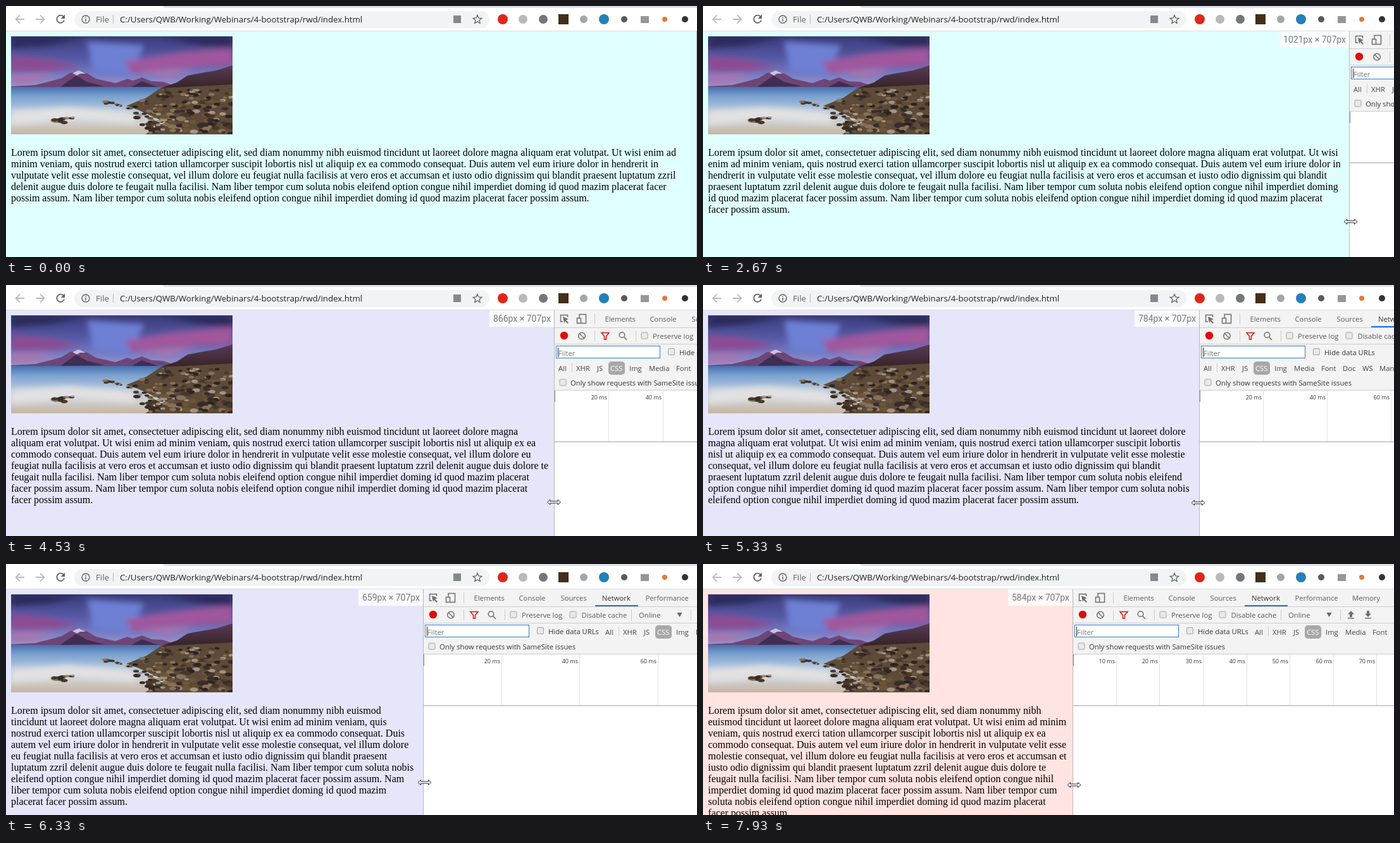
Recreate the animation shown at these times as an HTML page. Size 1092 px wide and 397 px high, loop 8000 ms.

```html
<!DOCTYPE html>
<html lang="en">
<head>
<meta charset="utf-8">
<title>Responsive page resize</title>
<style>
html, body { margin: 0; width: 100%; height: 100%; overflow: hidden; background: #fff; }
#page { position: absolute; left: 0; top: 40px; height: 357px; overflow: hidden; }
#photo { position: absolute; left: 8px; top: 8px; }
#page p { position: absolute; left: 8px; right: 8px; top: 183px; margin: 0; font: 16px/18px "Liberation Serif", serif; color: #000; }
#size { position: absolute; right: 0; top: 0; height: 26px; padding: 0 5px 0 6px; background: rgba(255,255,255,.8); color: #777; font: 14px/27px Roboto, sans-serif; white-space: nowrap; }
#stage { position: absolute; left: 0; top: 0; font: 11.25px "Open Sans", sans-serif; }
.line { fill: none; stroke: #6e6e6e; stroke-width: 1.5; }
</style>
</head>
<body>
<div id="page">
  <svg id="photo" width="350" height="155">
    <defs>
      <linearGradient id="sky" x2="0" y2="1">
        <stop offset="0" stop-color="#393b78"/><stop offset=".45" stop-color="#575ba8"/>
        <stop offset=".8" stop-color="#7f83c6"/><stop offset="1" stop-color="#a596c4"/>
      </linearGradient>
      <linearGradient id="shore" x2="0" y2="1">
        <stop offset="0" stop-color="#4670ae"/><stop offset=".2" stop-color="#7ba2d0"/>
        <stop offset=".5" stop-color="#b4c7dc"/><stop offset=".75" stop-color="#cfccca"/>
        <stop offset="1" stop-color="#c5b6a4"/>
      </linearGradient>
      <linearGradient id="hill" x2="0" y2="1">
        <stop offset="0" stop-color="#5b3a55"/><stop offset=".6" stop-color="#38262b"/>
        <stop offset="1" stop-color="#4a3a2a"/>
      </linearGradient>
      <filter id="soft" x="-30%" y="-60%" width="160%" height="220%"><feGaussianBlur stdDeviation="5"/></filter>
    </defs>
    <rect width="350" height="82" fill="url(#sky)"/>
    <g filter="url(#soft)">
      <path fill="#29295a" d="M0 0H120L60 14 0 18ZM350 0H240L300 14 350 18Z"/>
      <path fill="#6d80d4" d="M120 8L210 14 190 62 130 56Z"/>
      <path fill="#8c4b92" d="M0 30L60 36 110 48 70 54 0 56Z"/>
      <path fill="#a1579c" d="M180 40L260 26 350 18V46L250 50 190 58Z"/>
      <path fill="#a875ae" d="M0 60H70L30 74H0ZM200 56L290 50 250 66Z"/>
    </g>
    <path fill="#6d4577" d="M0 79L38 77 62 71 80 66 93 58 107 55 121 59 134 67 152 71 165 74 184 67 192 70 207 65 222 71 240 72 262 79V82H0Z"/>
    <path fill="#3f2d52" d="M78 80L103 62 120 72 148 79ZM190 80L207 71 232 80Z"/>
    <path fill="#cfc0de" d="M97 58L107 54 118 59 109 59 104 62Z"/>
    <rect y="80" width="350" height="75" fill="url(#shore)"/>
    <path filter="url(#soft)" fill="#e2e1e2" d="M0 118L90 112 190 120 200 138 100 132 0 140Z"/>
    <path fill="url(#hill)" d="M236 82L262 73 279 62 300 58 324 54 350 46V100L290 92Z"/>
    <path fill="#5d4a38" d="M236 82L350 76V155H212L244 136 200 116 182 110 214 97Z"/>
    <g id="rocks"></g>
  </svg>
  <p>Lorem ipsum dolor sit amet, consectetuer adipiscing elit, sed diam nonummy nibh euismod tincidunt ut laoreet dolore magna aliquam erat volutpat. Ut wisi enim ad minim veniam, quis nostrud exerci tation ullamcorper suscipit lobortis nisl ut aliquip ex ea commodo consequat. Duis autem vel eum iriure dolor in hendrerit in vulputate velit esse molestie consequat, vel illum dolore eu feugiat nulla facilisis at vero eros et accumsan et iusto odio dignissim qui blandit praesent luptatum zzril delenit augue duis dolore te feugait nulla facilisi. Nam liber tempor cum soluta nobis eleifend option congue nihil imperdiet doming id quod mazim placerat facer possim assum. Nam liber tempor cum soluta nobis eleifend option congue nihil imperdiet doming id quod mazim placerat facer possim assum.</p>
  <div id="size"></div>
</div>

<svg id="stage" width="1092" height="397">
  <g id="toolbar">
    <rect width="1092" height="40" fill="#fff"/>
    <path fill="#dee1e6" d="M247 0H1092V3H253Q249 3 247 0Z"/>
    <rect y="39" width="1092" height="1" fill="#dadce0"/>
    <rect x="108" y="8" width="656" height="27" rx="13.5" fill="#f1f3f4"/>
    <g fill="none" stroke="#babcbe" stroke-width="1.8">
      <path d="M29 21H16M22 14.5L15.5 21 22 27.5M47 21H60M54 14.5L60.5 21 54 27.5"/>
      <path stroke="#5f6368" d="M91 17A6 6 0 1 0 92 22.5"/>
      <circle cx="126" cy="21" r="6" stroke="#5f6368" stroke-width="1.4"/>
      <path stroke="#5f6368" stroke-width="1.5" d="M126 20V24.5M126 17.2V18.8"/>
      <path stroke="#5f6368" stroke-width="1.3" d="M745 14.5L746.9 19 751.8 19.4 748.1 22.6 749.2 27.3 745 24.8 740.8 27.3 741.9 22.6 738.2 19.4 743.1 19Z"/>
    </g>
    <path fill="#5f6368" d="M93 13.5V20H86.5Z"/>
    <rect x="169" y="14" width="1" height="14" fill="#b5b8bb"/>
    <g font-size="13.25">
      <text x="142" y="26" fill="#5f6368">File</text>
      <text x="180" y="26" fill="#202124">C:/Users/QWB/Working/Webinars/4-bootstrap/rwd/index.html</text>
    </g>
    <rect x="707" y="15" width="12" height="12" fill="#85888c"/>
    <circle cx="785" cy="21" r="8" fill="#e1251b"/>
    <circle cx="817" cy="21" r="7" fill="#b9b9b9"/>
    <circle cx="849" cy="21" r="7" fill="#74777a"/>
    <rect x="873" y="13" width="16" height="16" fill="#432f1b"/>
    <circle cx="913" cy="21" r="6" fill="#a2a6a8"/>
    <circle cx="945" cy="21" r="8" fill="#2380b8"/>
    <circle cx="977" cy="21" r="5" fill="#5a5a5a"/>
    <rect x="1003" y="16" width="13" height="11" fill="#969696"/>
    <circle cx="1041" cy="21" r="4" fill="#e17a3b"/>
    <circle cx="1073" cy="21" r="5" fill="#333"/>
  </g>
  <g id="panel">
    <rect y="40" width="520" height="357" fill="#fff"/>
    <rect id="header" y="40" width="520" fill="#f3f3f3"/>
    <g id="tabs"></g>
    <g id="controls"></g>
    <g id="filter">
      <rect x="3.5" y="96.5" width="164" height="19" fill="#fff" stroke="#2f7cd0"/>
      <rect x="6" y="99" width="1" height="15" fill="#222"/>
    </g>
    <g id="hide"></g>
    <g id="types"></g>
    <g id="only"></g>
    <g id="overview">
      <rect width="520" height="1" y="-1" fill="#ccc"/>
      <g id="ruler" font-size="9" text-anchor="end" fill="#333"></g>
      <rect width="520" height="2" y="80" fill="#ccc"/>
      <rect width="2" height="18" fill="#8a8a8a"/>
    </g>
    <rect y="40" width="1" height="357" fill="#b8b8b8"/>
  </g>
  <path id="cursor" d="M-10.5 0L-6 -4V-1.5H6V-4L10.5 0 6 4V1.5H-6V4Z" fill="#fff" stroke="#26263a"/>
</svg>

<script>
const $ = id => document.getElementById(id);
const add = (id, markup) => $(id).insertAdjacentHTML('beforeend', markup);
const label = (x, y, text, fill = '#333') => `<text x="${x}" y="${y}" fill="${fill}">${text}</text>`;
const bar = (x, y, w, h, fill = '#ccc') => `<rect x="${x}" y="${y}" width="${w}" height="${h}" fill="${fill}"/>`;
const line = (d, color = '#6e6e6e') => `<path class="line" d="${d}" style="stroke:${color}"/>`;
const box = (x, y) => `<rect x="${x - 5}" y="${y - 5}" width="10" height="10" rx="1.5" fill="#e9e9e9" stroke="#a2a2a2"/>`;
const move = (id, x, y) => $(id).setAttribute('transform', `translate(${x} ${y})`);

function buildPhoto() {
  let seed = 11;
  const random = () => (seed = seed * 16807 % 2147483647) / 2147483647;
  const tones = ['#2d231f', '#46382a', '#6d5638', '#87715a', '#382c28', '#a39384'];
  const rock = (x, y, rx) =>
    `<ellipse cx="${x}" cy="${y}" rx="${rx}" ry="${rx * .5}" fill="${tones[Math.floor(random() * 6)]}"/>`;
  let rocks = '';
  for (let i = 0; i < 190; i++) {
    const depth = random(), y = 84 + depth * 70;
    const left = depth < .4 ? 240 - depth * 140 : 184 + (depth - .4) * 55;
    rocks += rock(left + random() * (350 - left), y, 2 + depth * 5 * random() + random() * 3);
  }
  const patches = [[154, 105, 11], [170, 109, 7], [75, 133, 16], [92, 130, 9], [186, 114, 7]];
  for (const [x, y, r] of patches)
    for (let i = 0; i < 7; i++)
      rocks += rock(x + (random() - .5) * r * 1.4, y + (random() - .5) * r * .4, r * .35);
  add('rocks', rocks);
}

function buildPanel() {
  const grey = '#5a5a5a';
  const tabs = [['Elements', 80.5], ['Console', 151.5], ['Sources', 217.5], ['Network', 283], ['Performance', 351.5], ['Memory', 442]];
  add('tabs', bar(0, 67, 520, 1) + bar(64, 45, 1, 17) + bar(272, 65, 68, 2, '#1a73e8') +
    line('M14 58H10.5V47.5H21.5V51') +
    '<path fill="#6e6e6e" d="M14 50L23 54 19 55.5 23 59.5 21.5 61 17.5 57 16 60Z"/>' +
    line('M40 52V46.5H50.5V60.5H43M36.5 52.5H42.5V60.5H36.5Z') +
    tabs.map(([name, x]) => label(x, 58, name, name === 'Network' ? '#333' : grey)).join(''));

  add('controls', bar(0, 93, 520, 1) + [64, 129, 329, 423].map(x => bar(x, 72, 1, 17)).join('') +
    '<circle cx="16" cy="80" r="6.2" fill="#e00b0b"/>' +
    '<circle class="line" cx="44" cy="80.5" r="5.3"/>' + line('M40.3 76.8L47.7 84.2') +
    line('M75 75.5H87L82.5 81V86H79.5V81Z', '#d91010') +
    '<circle class="line" cx="107.5" cy="79" r="4.3"/>' + line('M110.5 82L115 87') +
    box(143, 80) + label(156, 85, 'Preserve log', grey) +
    box(237, 80) + label(250.5, 85, 'Disable cache', grey) +
    label(341, 85, 'Online', grey) + '<path fill="#666" d="M401.5 77H409.5L405.5 84Z"/>' +
    '<path fill="#6e6e6e" d="M440 74L445 79.5H442V84H438V79.5H435ZM435 85H445V86.5H435ZM467 84L472 78.5H469V74H465V78.5H462ZM462 85H472V86.5H462Z"/>');

  add('filter', label(7, 112, 'Filter', '#777'));
  add('hide', box(185.5, 105.5) + label(198, 111, 'Hide data URLs'));
  add('only', box(14, 130) + label(26, 135, 'Only show requests with SameSite issues'));

  const types = [['All', 7], ['XHR', 35], ['JS', 68], ['CSS', 89], ['Img', 119], ['Media', 150], ['Font', 193], ['Doc', 227], ['WS', 258], ['Manifest', 285]];
  add('types', '<rect x="86" y="97" width="26" height="21" rx="5" fill="#a8a8a8"/>' + bar(28, 99, 1, 15) +
    types.map(([name, x]) => label(x, 112, name, name === 'CSS' ? '#fff' : '#444')).join(''));
}

// time in s, page width, pointer offset from the divider, pointer y
const keys = [
  [1.2667, 1091, 3, 344.5], [1.6, 1084, 1, 343.5], [3.4, 964, 3.5, 340.5], [4.5333, 866, 0, 343.5],
  [5.3333, 784, -1.5, 344.5], [6.3333, 659, 2.5, 345.5], [7.9333, 584, 2.5, 349.5]
];

// Monotone cubic through one column of the keys
function sample(column, time) {
  const last = keys.length - 1;
  if (time <= keys[0][0]) return keys[0][column];
  if (time >= keys[last][0]) return keys[last][column];
  const i = keys.findIndex(key => key[0] > time) - 1;
  const secant = n => (keys[n + 1][column] - keys[n][column]) / (keys[n + 1][0] - keys[n][0]);
  const slope = n => {
    if (n === 0) return secant(0);
    if (n === last) return secant(last - 1);
    const a = secant(n - 1), b = secant(n);
    return a * b > 0 ? 2 * a * b / (a + b) : 0;
  };
  const span = keys[i + 1][0] - keys[i][0], u = (time - keys[i][0]) / span;
  const from = keys[i][column], rise = keys[i + 1][column] - from;
  return from + rise * u * u * (3 - 2 * u) +
    span * (slope(i) * u * (1 - u) ** 2 - slope(i + 1) * u * u * (1 - u));
}

function drawRuler(panelWidth) {
  const pxPerMs = panelWidth / 110;
  const step = [10, 20, 50].find(ms => ms * pxPerMs >= 64) || 50;
  let marks = '';
  for (let ms = step; ms < 110; ms += step) {
    const x = Math.round(ms * pxPerMs);
    marks += bar(x, 0, 1, 80, '#e2e2e2') + `<text x="${x - 2}" y="14">${ms} ms</text>`;
  }
  $('ruler').innerHTML = marks;
}

function draw(ms) {
  const time = Math.floor(ms * .015 + .1) / 15;
  const width = Math.round(sample(1, time));
  const panelWidth = 1339 - width;
  const rows = panelWidth > 660 ? 2 : panelWidth > 285 ? 3 : 4;
  const drop = (rows - 2) * 24;

  $('page').style.width = width + 'px';
  $('page').style.background = width > 991 ? '#e0ffff' : width > 600 ? '#e6e6fa' : '#ffe4e1';
  $('size').textContent = `${width}px × 707px`;
  $('size').style.display = time > 1.26 ? '' : 'none';

  move('panel', width, 0);
  $('header').setAttribute('height', 102 + drop);
  move('hide', rows === 4 ? -171 : 0, rows === 4 ? 24 : 0);
  move('types', rows === 2 ? 281 : 0, drop);
  move('only', 0, drop);
  move('overview', 0, 143 + drop);
  drawRuler(panelWidth);

  $('cursor').style.display = time > .73 ? '' : 'none';
  move('cursor', width + sample(2, time), sample(3, time));
}

buildPhoto();
buildPanel();
const start = performance.now();
function tick() {
  draw((performance.now() - start) % 8000);
  requestAnimationFrame(tick);
}
tick();
</script>
</body>
</html>
```
